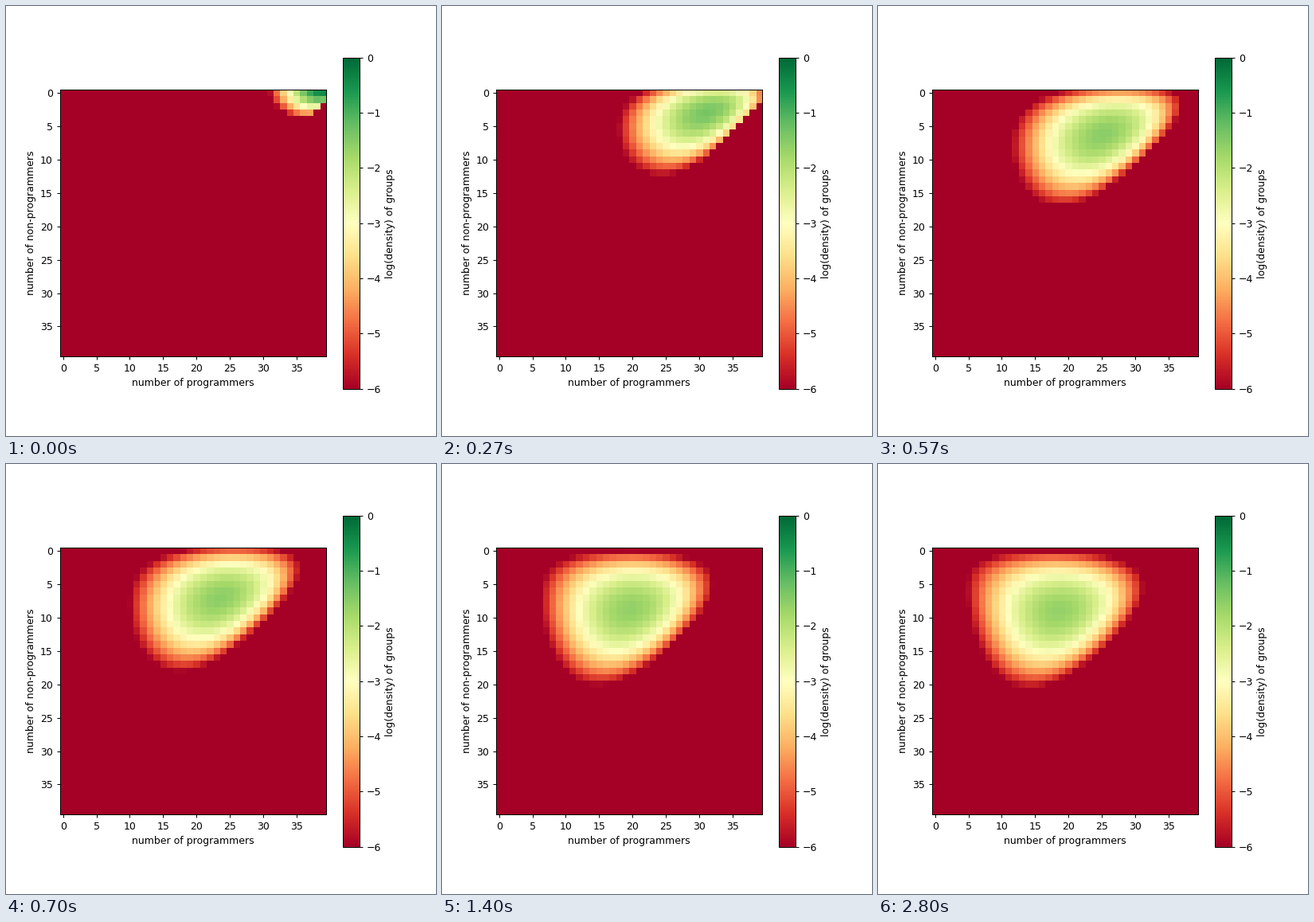
A matplotlib script for the animation above (8000 ms loop, 540 by 540 pixels).

```python
import matplotlib.pyplot as plt
import numpy as np
from matplotlib.animation import FuncAnimation

CELLS = 40
CAPACITY = 40      # largest possible group
FLOOR = -6         # lowest log density on the colour scale
FRAMES = 240
LOOP_MS = 8000
SUBSTEPS = 100     # Euler steps per frame
FIRST = 85         # Euler steps before the first frame

# Rates per frame
RECRUIT = 0.14
QUIT = 0.073       # non-programmers leaving
RETIRE = 0.0285    # programmers leaving
LEARN = 0.165

# Transition rates for a group of n non-programmers and p programmers
n, p = np.mgrid[0:CAPACITY + 1, 0:CAPACITY + 1]
size = n + p
recruit_rate = RECRUIT * size * np.maximum(1 - size / CAPACITY, 0)
quit_rate = QUIT * n
retire_rate = RETIRE * p
learn_rate = LEARN * n ** 2 / np.maximum(size, 1)
exit_rate = recruit_rate + quit_rate + retire_rate + learn_rate


def derivative(groups):
    """Master equation: probability flow between neighbouring group makeups."""
    change = -exit_rate * groups
    change[1:] += (recruit_rate * groups)[:-1]
    change[:-1] += (quit_rate * groups)[1:]
    change[:, :-1] += (retire_rate * groups)[:, 1:]
    change[:-1, 1:] += (learn_rate * groups)[1:, :-1]
    return change


def simulate():
    """Log density of groups for every frame, from all-programmer groups."""
    groups = np.zeros(n.shape)
    groups[0, CELLS - 1] = 1
    history = []
    for frame in range(FRAMES):
        for _ in range(SUBSTEPS if frame else FIRST):
            groups = groups + derivative(groups) / SUBSTEPS
        shown = groups[:CELLS, :CELLS]
        history.append(np.log10(np.maximum(shown, 10.0 ** FLOOR)))
    return history


history = simulate()

fig = plt.figure(figsize=(6, 6), dpi=90)
image = plt.imshow(history[0], cmap="RdYlGn", vmin=FLOOR, vmax=0,
                   interpolation="nearest")
plt.xlabel("number of programmers")
plt.ylabel("number of non-programmers")
plt.colorbar(image, label="log(density) of groups")


def update(frame):
    image.set_data(history[frame])
    return [image]


anim = FuncAnimation(fig, update, frames=FRAMES, interval=LOOP_MS / FRAMES,
                     repeat=True, repeat_delay=0)
plt.show()
```
